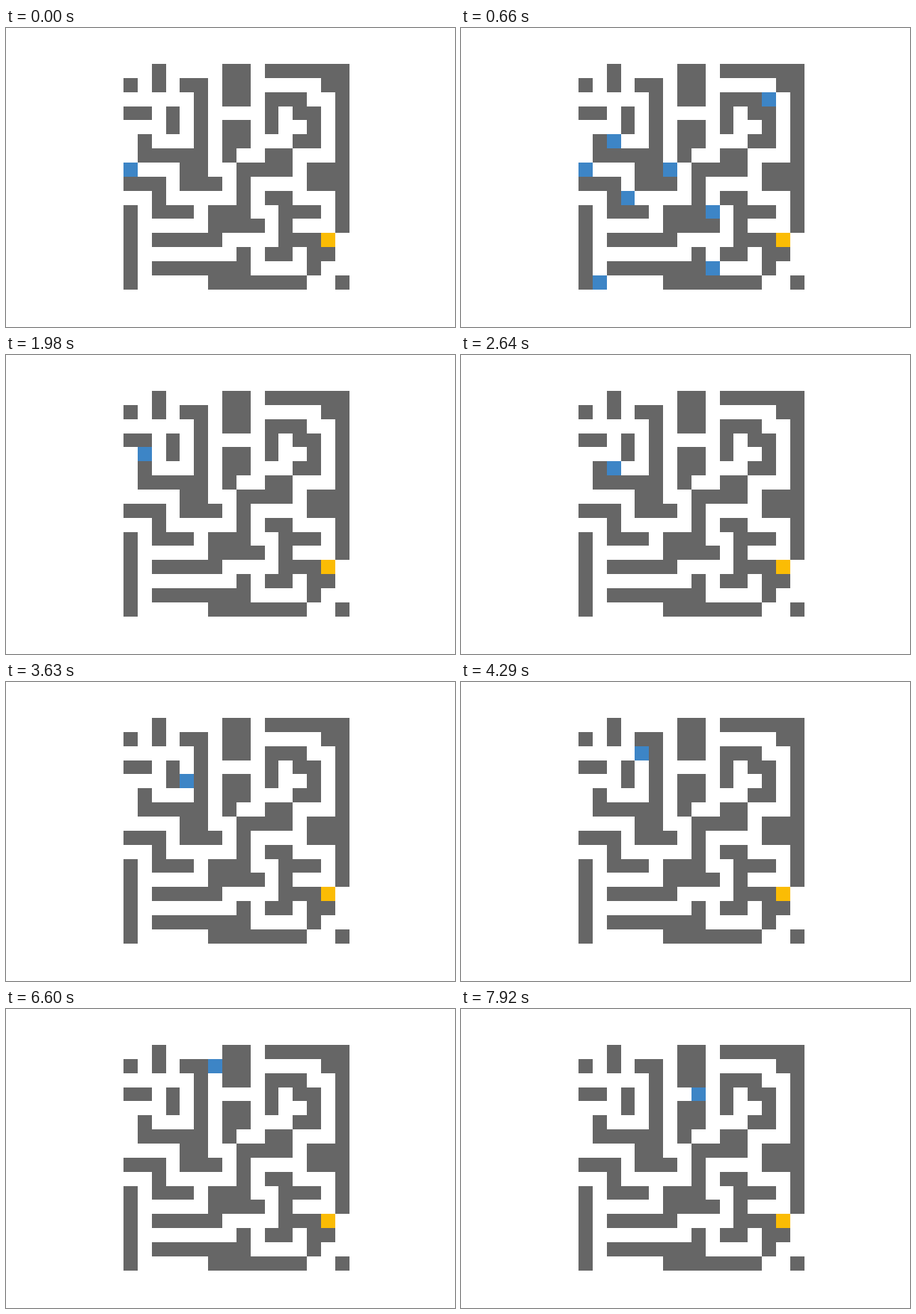
Animation of 600 by 400 pixels, one loop 8 s. Source, as an HTML page with a canvas:

```html
<!DOCTYPE html>
<html lang="en">
<head>
<meta charset="utf-8">
<title>Maze walk</title>
<style>
  html, body { margin: 0; width: 100%; height: 100%; overflow: hidden; background: #fff; }
  canvas { display: block; }
</style>
</head>
<body>
<canvas id="stage" width="600" height="400"></canvas>
<script>
const LOOP = 8000, STEP = 330, CELL = 18.85, LEFT = 157, TOP = 48;
const WALL = '#666666', WALKER = '#3d85c6', GOAL = '#fbbc04';

const maze = [
  '..#....##.######',
  '#.#.##.##.....##',
  '.....#.##.###..#',
  '##.#.#....#.##.#',
  '...#.#.##.#..#.#',
  '.#...#.##...##.#',
  '.#####.#..##...#',
  '....##..####.###',
  '###.###.#....###',
  '..#.....#.##...#',
  '#.###.###..###.#',
  '#.....####.#...#',
  '#.#####....###G.',
  '#.......#.##.##.',
  '#.#######....#..',
  '#.....#######..#'
];
const moves = 'UUURRDRRUUULUURRRDDDRR';
const dirs = { U: [0, -1], D: [0, 1], L: [-1, 0], R: [1, 0] };
const start = [0, 7];
const guesses = [[13, 2], [2, 5], [6, 7], [3, 9], [9, 10], [9, 14], [1, 15]];

const ctx = document.getElementById('stage').getContext('2d');
const edge = (origin, i) => Math.round(origin + i * CELL + 0.01);

function fillCell(col, row, color) {
  const x = edge(LEFT, col), y = edge(TOP, row);
  ctx.fillStyle = color;
  ctx.fillRect(x, y, edge(LEFT, col + 1) - x, edge(TOP, row + 1) - y);
}

// Follows the shared moves; null once a wall is hit.
function walk([col, row], count) {
  for (const m of moves.slice(0, count)) {
    col += dirs[m][0];
    row += dirs[m][1];
    if (maze[row]?.[col] !== '.') return null;
  }
  return [col, row];
}

function draw(t) {
  const tick = Math.floor(t / STEP);
  const count = Math.max(0, tick - 2);
  ctx.fillStyle = '#fff';
  ctx.fillRect(0, 0, 600, 400);
  maze.forEach((line, row) => [...line].forEach((c, col) => {
    if (c !== '.') fillCell(col, row, c === 'G' ? GOAL : WALL);
  }));
  // Other candidate positions are shown until only one fits.
  const active = tick >= 2 && tick < 6 ? [start, ...guesses] : [start];
  for (const from of active) {
    const at = walk(from, count);
    if (at) fillCell(at[0], at[1], WALKER);
  }
}

const begin = performance.now();
function frame() {
  draw((performance.now() - begin) % LOOP);
  requestAnimationFrame(frame);
}
frame();
</script>
</body>
</html>
```
